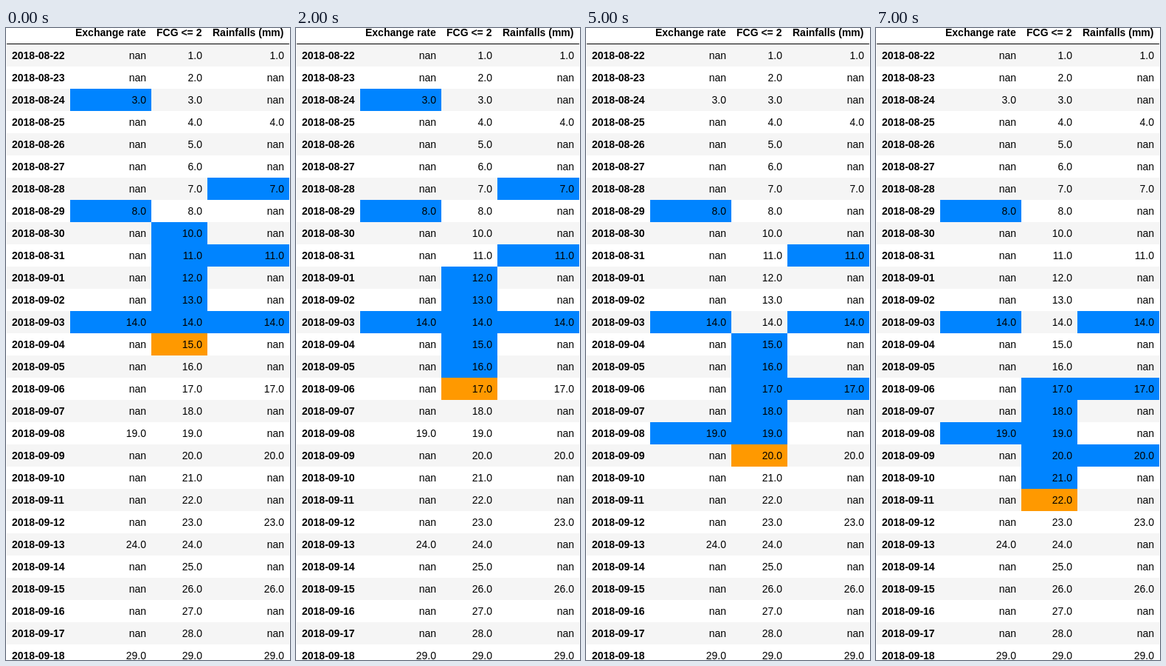
These frames come from a looping animation (385x853 px, 8 s). An HTML page:

```html
<!DOCTYPE html>
<html lang="en">
<head>
<meta charset="utf-8">
<title>Sliding window over lagged columns</title>
<style>
  html, body { margin: 0; width: 100%; height: 100%; overflow: hidden; background: #fff; }
  #table {
    position: absolute; left: 0; top: 0; width: 385px; height: 853px; overflow: hidden;
    font: 14px/16px "Liberation Sans", Arial, sans-serif; color: #000;
  }
  .row {
    position: absolute; left: 1px; width: 383px; height: 30px;
    display: grid; grid-template-columns: 86px 110px 76px 111px;
  }
  .row div { padding: 7px; text-align: right; white-space: nowrap; }
  .row.odd { background: #f5f5f5; }
  .row.head div, .row div:first-child { font-weight: bold; text-align: left; }
  .head { top: -9px; border-bottom: 1px solid #000; }
  .row .past { background: #0084ff; }
  .row .now { background: #ff9900; }
</style>
</head>
<body>
<div id="table"></div>
<script>
const ROWS = 28, STEP = 1000, STEPS = 8, FIRST = 13, TOP = 22, PITCH = 30;

// Each column has a value where has(row) holds, and marks its latest `lags` values.
const columns = [
  { title: "Exchange rate", lags: 3, has: r => r % 5 === 2 },
  { title: "FCG <= 2", lags: 5, has: () => true, target: true },
  { title: "Rainfalls (mm)", lags: 3, has: r => r % 3 === 0 }
];

const table = document.getElementById("table");

function addRow(texts, kind) {
  const row = document.createElement("div");
  row.className = "row " + kind;
  const cells = texts.map(text => {
    const cell = document.createElement("div");
    cell.textContent = text;
    row.append(cell);
    return cell;
  });
  table.append(row);
  return { row, cells };
}

const dateOf = r => new Date(Date.UTC(2018, 7, 22 + r)).toISOString().slice(0, 10);
const valueOf = r => (r < 8 ? r + 1 : r + 2).toFixed(1);

addRow(["", ...columns.map(c => c.title)], "head");
const grid = Array.from({ length: ROWS }, (_, r) => {
  const texts = columns.map(c => c.has(r) ? valueOf(r) : "nan");
  const { row, cells } = addRow([dateOf(r), ...texts], r % 2 ? "" : "odd");
  row.style.top = TOP + PITCH * r + "px";
  return cells.slice(1);
});

function mark(current) {
  columns.forEach((c, i) => {
    let left = c.lags;
    for (let r = ROWS - 1; r >= 0; r--) {
      const past = r < current && c.has(r) && left-- > 0;
      grid[r][i].className = past ? "past" : c.target && r === current ? "now" : "";
    }
  });
}

let start, shown = -1;
function draw(now) {
  start ??= now;
  const step = Math.floor(Math.max(0, now - start) / STEP) % STEPS;
  if (step !== shown) mark(FIRST + (shown = step));
  requestAnimationFrame(draw);
}
draw(performance.now());
</script>
</body>
</html>
```
